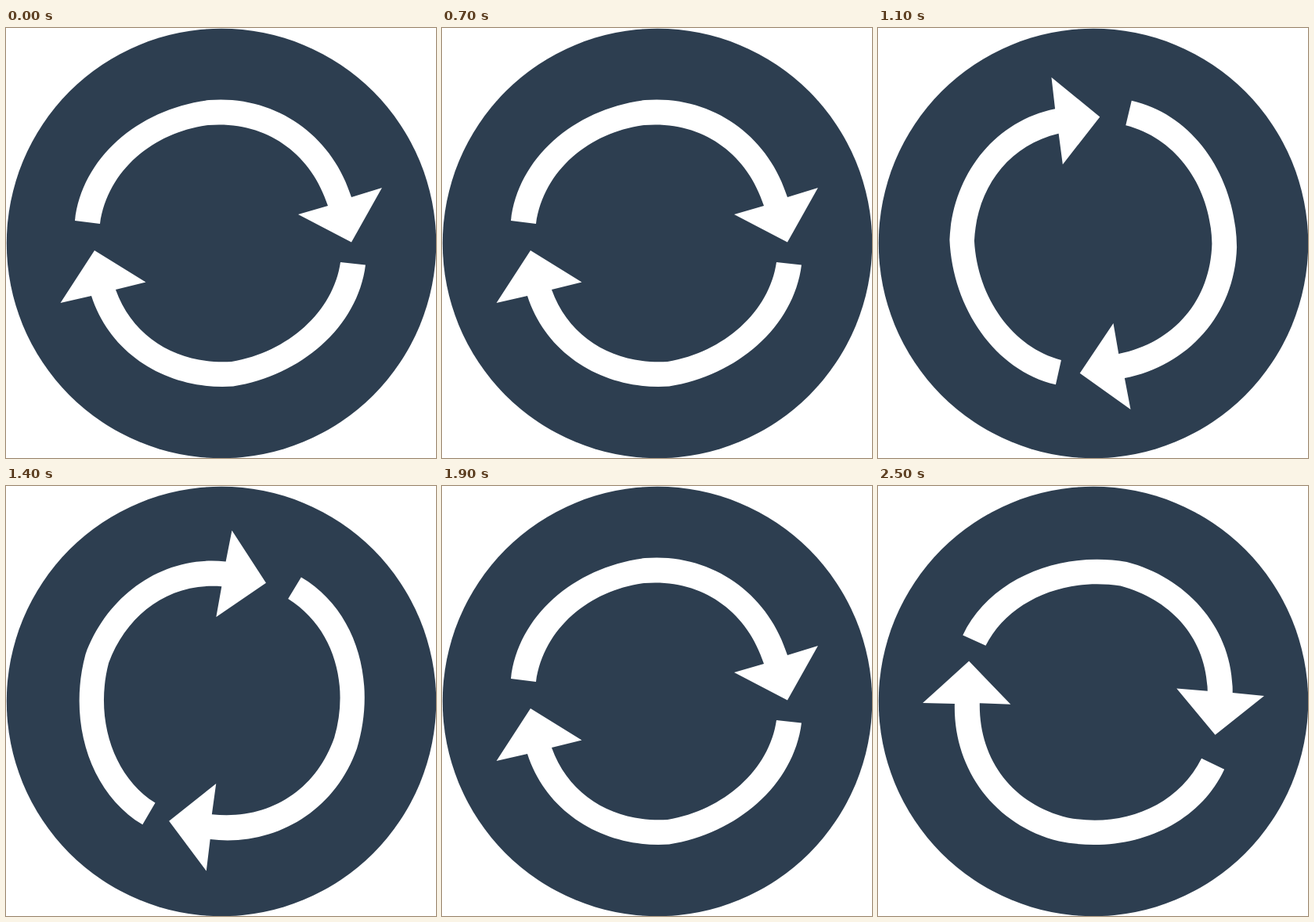
Animation, 549 px wide and 549 px high, one loop 2.6 s. Source, as an HTML page:

```html
<!DOCTYPE html>
<html lang="en">
<head>
<meta charset="utf-8">
<title>Turning arrows</title>
<style>
  html, body { margin: 0; width: 100%; height: 100%; overflow: hidden; background: #fff; }
  svg { display: block; width: 100%; height: 100%; }
</style>
</head>
<body>
<svg viewBox="0 0 549 549">
  <circle cx="275" cy="275" r="274.2" fill="#2d3e50"/>
  <g id="arrows" fill="#fff">
    <path d="M88 246 C97 165 170 103 259 92 C345 85 417 138 441 216 L480 204 L441 273.5 L373 238 L411 227
             C389 158 330 118 258 124 C190 133 130 180 120 250 Z"/>
    <path d="M459 302.5 C449 382 376 444 290 457.5 C211 463 134 420 109 342 L69.5 351 L113 284 L178.5 324.5 L140 334
             C163 398 222 430 288 426 C360 414 418 362 427 299 Z"/>
  </g>
</svg>
<script>
  const STEP = 100;
  // The pair turns evenly within each leg; half a turn looks almost like none
  const legs = [
    { steps: 4, from: 0, to: 96.3 },
    { steps: 3, from: 96.3, to: 180 },
    { steps: 4, from: 0, to: 96.3 },
    { steps: 3, from: 96.3, to: 294 },
    { steps: 5, from: 114, to: 360 },
    { steps: 6, from: 0, to: 198.5 },
    { steps: 1, from: 198.5, to: 360 }
  ];
  const total = legs.reduce((sum, leg) => sum + leg.steps, 0);
  const arrows = document.getElementById("arrows");
  const start = performance.now();

  function angleAt(step) {
    for (const { steps, from, to } of legs) {
      if (step < steps) return from + (to - from) * step / steps;
      step -= steps;
    }
  }

  function draw() {
    const step = Math.floor((performance.now() - start) / STEP) % total;
    arrows.setAttribute("transform", `rotate(${angleAt(step)} 274.5 275)`);
    requestAnimationFrame(draw);
  }
  draw();
</script>
</body>
</html>
```
